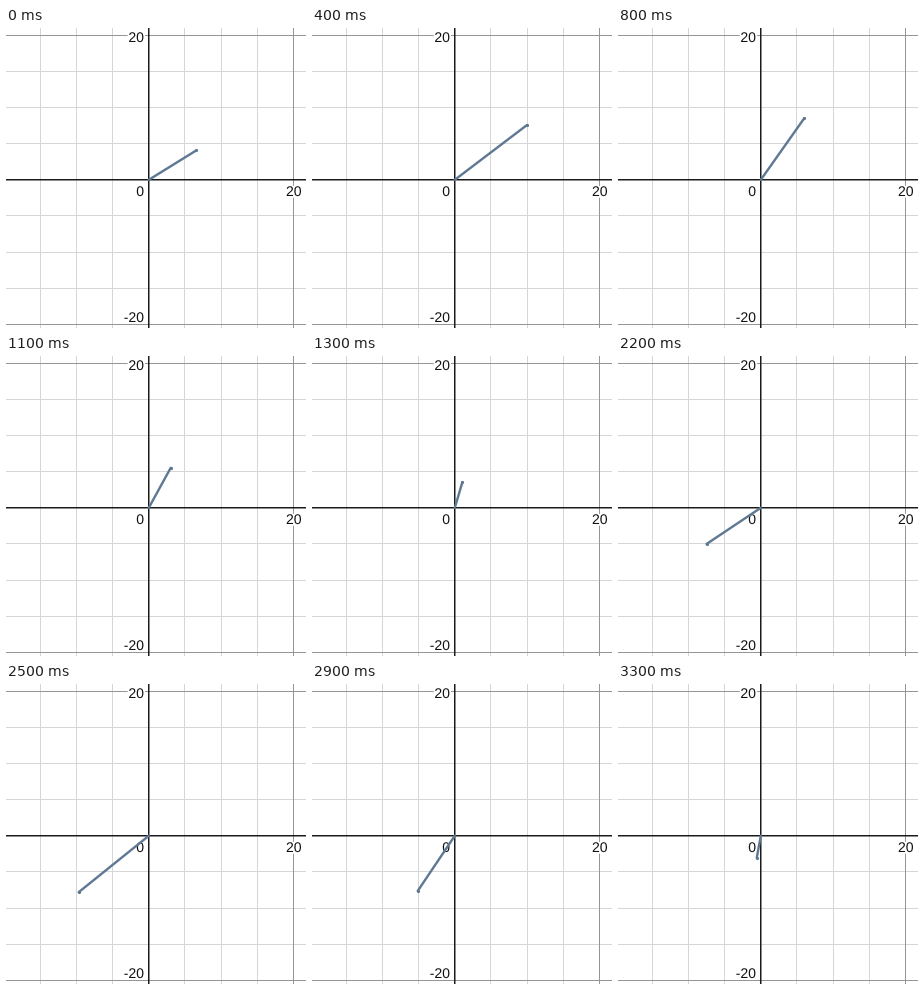
These frames come from a looping animation (300 by 300 pixels, 3.4 s). A matplotlib script:

```python
import matplotlib.pyplot as plt
import matplotlib.patheffects as pe
import numpy as np
from matplotlib.animation import FuncAnimation

SIZE, DPI = 300, 100
PX = 72 / DPI                 # one pixel in points
FRAMES, STEP_MS = 34, 100
OX, OY = 142.8, 151.8         # origin on the stage
UNIT = 7.225                  # pixels per unit
LIMIT, LAG = 10, 2.5
INK = "#5f7893"

# Distance travelled by the bouncing value, as time knots
KNOTS_T = [0, 4, 8, 13, 18, 25, 33]
KNOTS_U = [-3.44, 0.05, 4.0, 8.95, 13.8, 20.3, 29.44]

fig = plt.figure(figsize=(SIZE / DPI, SIZE / DPI), dpi=DPI, facecolor="white")
ax = fig.add_axes([0, 0, 1, 1])
ax.set_xlim(0, SIZE)
ax.set_ylim(SIZE, 0)
ax.axis("off")


def rule(pos, vertical, color, width=1, z=1):
    xs, ys = ([pos, pos], [-5, SIZE + 5])
    if not vertical:
        xs, ys = ys, xs
    ax.plot(xs, ys, color=color, lw=width * PX, snap=False, zorder=z)


def label(x, y, text, ha="right"):
    halo = pe.withStroke(linewidth=3.5 * PX, foreground="white")
    ax.text(x, y, text, ha=ha, va="baseline", family="Liberation Sans",
            fontsize=14 * PX, color="#111111", zorder=4, path_effects=[halo])


def bounce(u):
    """Triangle wave between -LIMIT and LIMIT, at its top when u is 0."""
    u = (u + 2 * LIMIT) % (4 * LIMIT) - 2 * LIMIT
    return LIMIT - abs(u)


for k in range(-4, 5):
    if k == 0:
        continue
    major = k in (-4, 4)
    color = "#959595" if major else "#d6d6d6"
    z = 2 if major else 1
    rule(np.floor(OX + 36.15 * k) + 0.5, True, color, z=z)
    rule(np.floor(OY + 36.15 * k) + 0.5, False, color, z=z)

rule(142.75, True, "#1a1a1a", 1.5, 3)
rule(151.75, False, "#1a1a1a", 1.5, 3)

label(138, 14, "20")
label(138, 294, "-20")
label(138, 168, "0")
label(287.8, 168, "20", "center")

arm, = ax.plot([], [], color=INK, lw=2.4 * PX, solid_capstyle="round", zorder=5)
tip, = ax.plot([], [], "o", color=INK, ms=3.2 * PX, mew=0, zorder=6)


def draw(i):
    u = np.interp(i, KNOTS_T, KNOTS_U)
    x = OX + UNIT * bounce(u)
    y = OY - UNIT * bounce(u - LAG)
    arm.set_data([OX, x], [OY, y])
    tip.set_data([x], [y])
    return arm, tip


anim = FuncAnimation(fig, draw, frames=FRAMES, interval=STEP_MS,
                     repeat=True, repeat_delay=0, blit=False)
plt.show()
```
